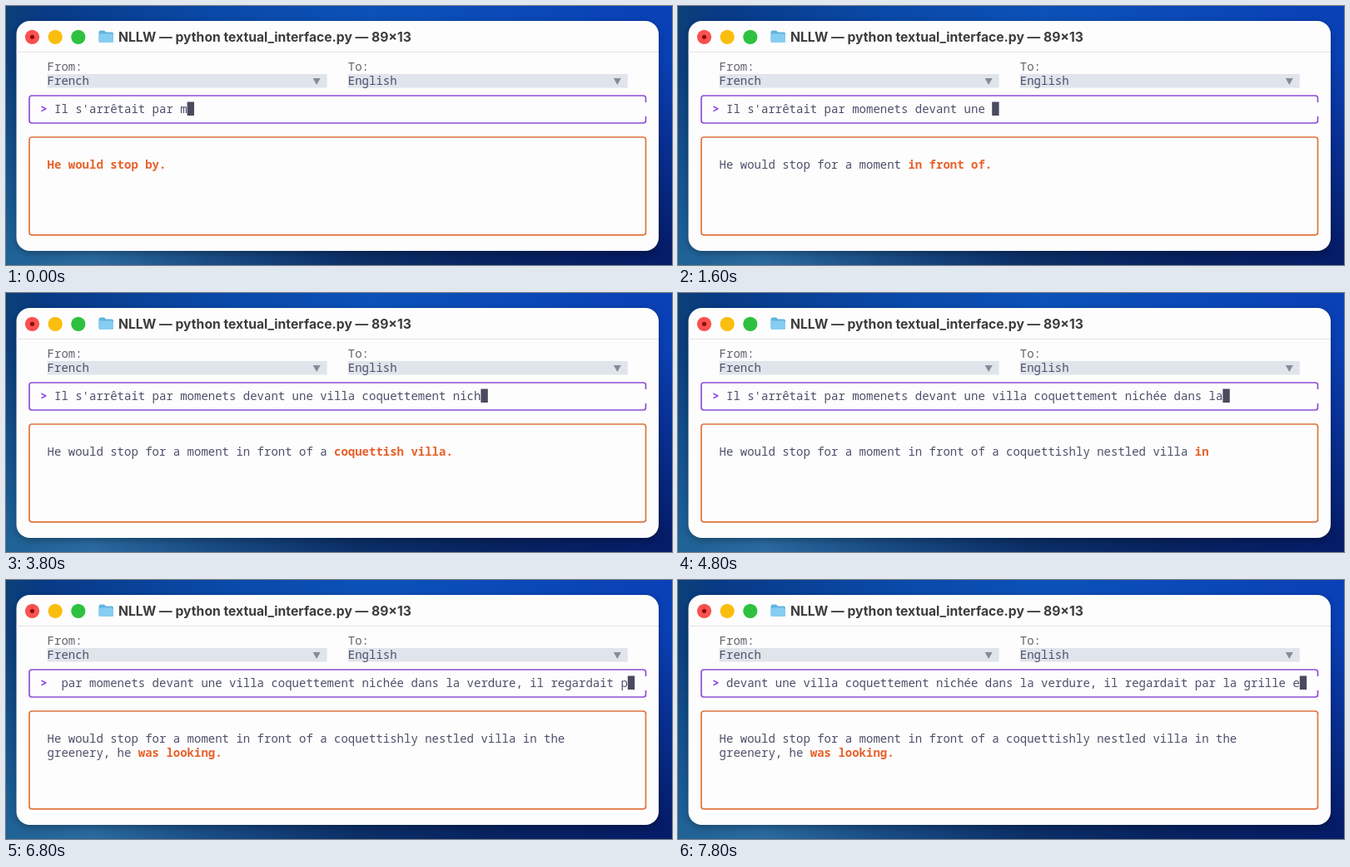
An HTML page that plays this animation: 800x312 px, repeating every 8000 ms.

```html
<!DOCTYPE html>
<html lang="en">
<head>
<meta charset="utf-8">
<title>Live translation terminal</title>
<style>
  html, body { margin: 0; width: 100%; height: 100%; overflow: hidden; background: #0a3f90; }
  svg { display: block; width: 100vw; height: 100vh; }
  text { white-space: pre; }
  .mono { font: 500 14px "Noto Sans Mono", "Liberation Mono", monospace; fill: #4c4f69; }
  .title { font: 700 15.7px Inter, "Open Sans", sans-serif; fill: #3c3c3c; }
  .fresh { fill: #e8612c; font-weight: 600; }
  .box { fill: none; stroke-width: 1.7; }
</style>
</head>
<body>
<svg viewBox="0 0 800 312" preserveAspectRatio="none">
  <defs>
    <linearGradient id="top">
      <stop offset="0" stop-color="#0c3f78"/>
      <stop offset=".06" stop-color="#083a86"/>
      <stop offset=".3" stop-color="#0a48a6"/>
      <stop offset=".55" stop-color="#0b51b8"/>
      <stop offset="1" stop-color="#0a40b6"/>
    </linearGradient>
    <linearGradient id="bottom">
      <stop offset="0" stop-color="#1f6296"/>
      <stop offset=".13" stop-color="#2a6a9f"/>
      <stop offset=".3" stop-color="#1a4d86"/>
      <stop offset=".52" stop-color="#0c3068"/>
      <stop offset=".72" stop-color="#082460"/>
      <stop offset="1" stop-color="#051c68"/>
    </linearGradient>
    <linearGradient id="fade" x2="0" y2="1">
      <stop offset=".2" stop-color="#000"/>
      <stop offset=".95" stop-color="#fff"/>
    </linearGradient>
    <mask id="lower"><rect width="800" height="312" fill="url(#fade)"/></mask>
    <filter id="soft" x="-5%" y="-10%" width="110%" height="125%"><feGaussianBlur stdDeviation="5"/></filter>
  </defs>

  <rect width="800" height="312" fill="url(#top)"/>
  <rect width="800" height="312" fill="url(#bottom)" mask="url(#lower)"/>
  <rect x="13" y="21" width="771" height="277" rx="16" opacity=".3" filter="url(#soft)"/>

  <rect x="12.5" y="18" width="771.5" height="277" rx="16" fill="#fdfdfd"/>
  <path d="M12.5 55.5H784" stroke="#e3e3e3"/>
  <circle cx="31.5" cy="37.3" r="8.6" fill="#fa514d"/>
  <circle cx="31.5" cy="37.3" r="2.6" fill="#86100f"/>
  <circle cx="59.2" cy="37.3" r="8.6" fill="#fbbd0e"/>
  <circle cx="86.8" cy="37.3" r="8.6" fill="#2ec140"/>
  <path d="M111.5 31.5q0-2 2-2h4.5l2 2h7q2 0 2 2v8.500q0 2-2 2h-13.500q-2 0-2-2z" fill="#62b3e0"/>
  <rect x="111.500" y="33.500" width="17.500" height="10.500" rx="2" fill="#86cdf2"/>
  <text class="title" x="135" y="43">NLLW — python textual_interface.py — 89×13</text>

  <g id="selects"></g>

  <path class="box" stroke="#8f4fd8" d="M768.500 116V111q0-3-3-3H31q-3 0-3 3V138q0 3 3 3H765.500q3 0 3-3V133"/>
  <rect class="box" stroke="#e0743f" x="28" y="158" width="740.500" height="117.800" rx="3"/>

  <text class="mono" x="41.200" y="129" style="fill:#8839ef;font-weight:700">&gt;</text>
  <text class="mono" id="typed" x="58" y="129"></text>
  <rect id="cursor" y="115.500" width="8.400" height="16.500" fill="#4a4a60"/>

  <g id="output">
    <text class="mono" x="49.600" y="196"><tspan></tspan><tspan class="fresh"></tspan></text>
    <text class="mono" x="49.600" y="213"><tspan></tspan><tspan class="fresh"></tspan></text>
  </g>
</svg>
<script>
const LOOP = 8000, STEP = 200, CELL = 8.4;
const INPUT_COLS = 82, OUTPUT_COLS = 83;
const $ = id => document.getElementById(id);

const french = "Il s'arrêtait par momenets devant une villa coquettement " +
  "nichée dans la verdure, il regardait par la grille e";
const english = ("He would stop for a moment in front of a coquettishly nestled " +
  "villa in the greenery, he").split(" ");

// [ms, characters typed]
const typing = [[0, 19], [800, 29], [2600, 49], [4800, 71], [6000, 86],
  [6200, 86], [6800, 95], [7800, 109]];

// [ms, settled words, tail still open to change]
const guesses = [
  [0, 0, "He would stop by."],
  [600, 3, "for a moment."],
  [1400, 6, "in front of."],
  [1800, 9, "a"],
  [2400, 10, "villa."],
  [3400, 10, "coquettish villa."],
  [4000, 10, "coquettishly nestled villa."],
  [4600, 13, "in"],
  [5200, 14, "the"],
  [5800, 15, "greenery."],
  [6400, 15, "greenery, he"],
  [6800, 17, "was looking."]
];

function addSelect(x, label, value) {
  $("selects").innerHTML += `
    <text class="mono" x="${x}" y="78" style="fill:#62626c">${label}</text>
    <rect x="${x}" y="82" width="${40 * CELL}" height="16.500" fill="#e0e4eb"/>
    <text class="mono" x="${x}" y="95">${value}</text>
    <path d="M${x + 319} 87h9l-4.500 8z" fill="#888b96"/>`;
}

function typedCount(t) {
  const i = typing.findLastIndex(([ms]) => ms <= t);
  const [t0, n0] = typing[i], [t1, n1] = typing[i + 1] || [LOOP, n0];
  return Math.round(n0 + (n1 - n0) * (t - t0) / (t1 - t0));
}

function drawInput(t) {
  const n = typedCount(t), start = Math.max(0, n - INPUT_COLS);
  $("typed").textContent = french.slice(start, n);
  $("cursor").setAttribute("x", 58 + (n - start) * CELL);
}

function drawOutput(t) {
  const [, count, tail] = guesses.findLast(([ms]) => ms <= t);
  const settled = english.slice(0, count).map(w => w + " ").join("");
  const all = settled + tail, cut = settled.length;
  const wrap = all.length > OUTPUT_COLS ? all.lastIndexOf(" ", OUTPUT_COLS) + 1 : all.length;
  [[0, wrap], [wrap, all.length]].forEach(([from, to], i) => {
    const mid = Math.min(to, Math.max(from, cut));
    const [plain, fresh] = $("output").children[i].children;
    plain.textContent = all.slice(from, mid);
    fresh.textContent = all.slice(mid, to);
  });
}

function draw(now) {
  const t = Math.floor(now % LOOP / STEP) * STEP;
  drawInput(t);
  drawOutput(t);
}

addSelect(49.6, "From:", "French");
addSelect(410.8, "To:", "English");

const began = performance.now();
function tick() {
  draw(performance.now() - began);
  requestAnimationFrame(tick);
}
tick();
</script>
</body>
</html>
```
